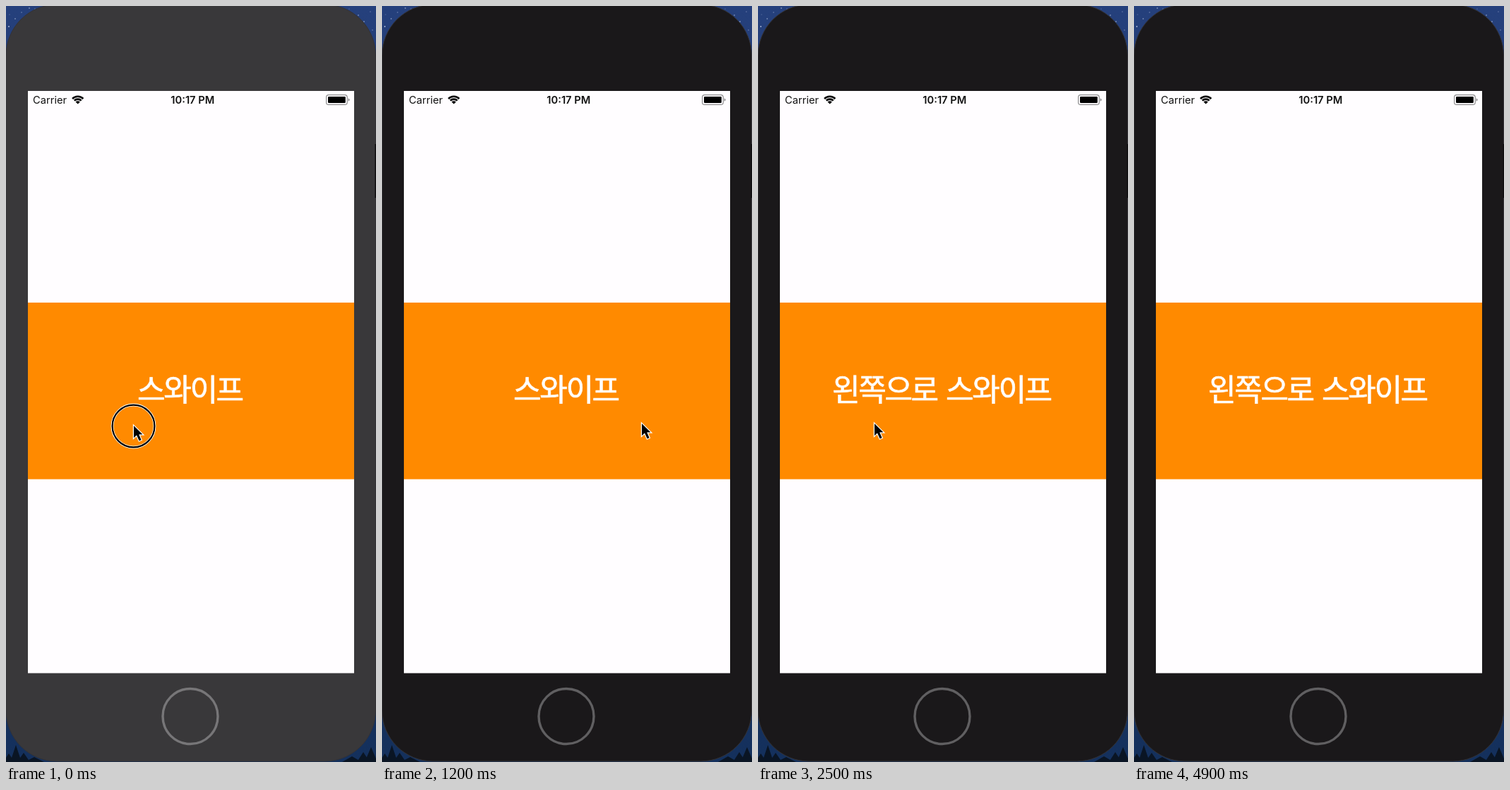
Animation of 524x1068 px, one loop 5000 ms. Source, as an HTML page:

```html
<!DOCTYPE html>
<html lang="ko">
<head>
<meta charset="utf-8">
<title>Swipe demo</title>
<style>
  html, body { margin: 0; width: 100%; height: 100%; overflow: hidden; background: #1a181a; }
  svg { display: block; width: 100vw; height: 100vh; }
  .status { font: 400 14.7px Inter, Roboto, sans-serif; fill: #111; }
  .bold { font-weight: 600; }
  .label { font: 400 43px "Noto Sans CJK KR", "Noto Sans CJK", sans-serif; letter-spacing: -2.36px;
           fill: #fff; stroke: #fff; stroke-width: .7; }
</style>
</head>
<body>
<svg viewBox="0 0 524 1068" preserveAspectRatio="none">
  <defs>
    <linearGradient id="sky" x1="0" y1="0" x2="0" y2="1">
      <stop offset="0" stop-color="#25407c"/>
      <stop offset="1" stop-color="#14305c"/>
    </linearGradient>
  </defs>
  <rect width="524" height="1068" fill="url(#sky)"/>
  <g id="stars" fill="#c4d0ec"></g>
  <path id="trees" fill="#0a1524"/>

  <rect id="body" x="0" y="-2" width="523.5" height="1069" rx="72" stroke="#333236" stroke-width="1"/>
  <rect x="522.5" y="195" width="1.5" height="76" fill="#0d0c0e"/>
  <circle id="home" cx="261" cy="1003.5" r="39" fill="none" stroke-width="3.4"/>

  <rect x="31" y="120" width="462" height="822.5" fill="#fffdff"/>
  <rect x="31" y="419" width="462" height="249.5" fill="#ff8a00"/>

  <text class="status" x="38" y="138">Carrier</text>
  <text class="status bold" x="264.3" y="138" text-anchor="middle">10:17 PM</text>
  <g id="wifi" transform="translate(101.7 138.6)" fill="none" stroke="#000" stroke-width="2.6"></g>
  <rect x="453.6" y="125.6" width="29.6" height="13.8" rx="3.2" fill="none" stroke="#8c8b8d" stroke-width="1.2"/>
  <rect x="456" y="128" width="24.8" height="9" rx="1.2" fill="#000"/>
  <path d="M484.6 130.2q2 .7 2 2.3t-2 2.3z" fill="#8c8b8d"/>

  <text class="label" id="left" x="105" y="557.5">왼쪽으로</text>
  <text class="label" id="swipe" y="557.5">스와이프</text>

  <g id="pointer">
    <g id="ring" fill="none">
      <circle cx=".5" cy="2.5" r="30" stroke="#fff" stroke-width="3.8"/>
      <circle cx=".5" cy="2.5" r="29.9" stroke="#000" stroke-width="2.2"/>
    </g>
    <path d="M1 2V19L5 15.3L8.6 23.2L11.6 21.9L8.2 14.2H13.4Z" fill="#000"
          stroke="#fff" stroke-width="2.4" paint-order="stroke"/>
  </g>
</svg>
<script>
  const LOOP = 5000, STEP = 100;
  const $ = id => document.getElementById(id);
  const set = (id, attrs) => {
    for (const k in attrs) $(id).setAttribute(k, attrs[k]);
  };
  const show = (id, on) => set(id, { visibility: on ? "visible" : "hidden" });
  const ease = (t, from, to) => {
    const p = Math.min(1, Math.max(0, (t - from) / (to - from)));
    return p * p * (3 - 2 * p);
  };

  function buildScene() {
    const stars = [[5, 12], [13, 18], [33, 3], [41, 4], [22, 9], [4, 29], [486, 4], [499, 13], [507, 22], [516, 8], [519, 34]];
    $("stars").innerHTML = stars.map(([x, y], i) =>
      `<circle cx="${x}" cy="${y}" r="${0.6 + i % 3 * 0.2}" opacity="${0.5 + i % 2 * 0.3}"/>`).join("");

    const tree = (x, top, w) => `M${x - w} 1068L${x} ${top}L${x + w} 1068Z`;
    set("trees", {
      d: tree(4, 1056, 8) + tree(14, 1044, 8) + tree(25, 1055, 9) + tree(40, 1061, 14) +
         tree(490, 1060, 14) + tree(506, 1054, 9) + tree(517, 1047, 9)
    });

    const arc = r => {
      const d = r * Math.SQRT1_2;
      return `M${-d} ${-d}A${r} ${r} 0 0 1 ${d} ${-d}`;
    };
    $("wifi").innerHTML = `<path d="${arc(10.8)}${arc(7)}"/>` +
      `<path d="${arc(4.4)}L0 0Z" fill="#000" stroke="none"/>`;
  }

  function draw(t) {
    const dim = t < 100;
    set("body", { fill: dim ? "#39383a" : "#1a181a" });
    set("home", { stroke: dim ? "#777678" : "#605f61" });

    const right = ease(t, 100, 500), back = ease(t, 1200, 1615);
    const x = 180 + 187 * right - 203 * back;
    const y = 591 - 3 * right;
    const pressed = t < 600 || (t >= 1300 && t < 1800);
    const visible = t < 3100;
    set("pointer", { transform: `translate(${x.toFixed(2)} ${y.toFixed(2)})` });
    show("pointer", visible);
    show("ring", visible && pressed);

    const swiped = t >= 1500;
    show("left", swiped);
    set("swipe", { x: swiped ? 266 : 186 });
  }

  const start = performance.now();
  function tick() {
    const t = (performance.now() - start) % LOOP;
    draw(Math.floor(t / STEP) * STEP);
    requestAnimationFrame(tick);
  }

  buildScene();
  draw(0);
  requestAnimationFrame(tick);
</script>
</body>
</html>
```
